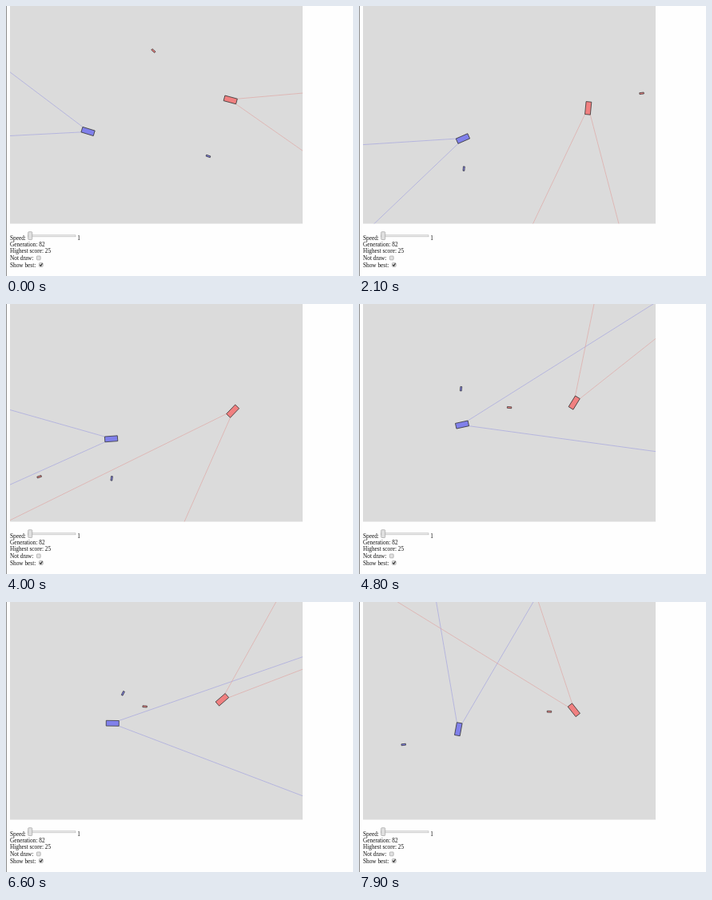
An HTML page that plays this animation: 434 px wide and 338 px high, repeating every 8000 ms.

```html
<!DOCTYPE html>
<html lang="en">
<head>
<meta charset="utf-8">
<title>Tank duel</title>
<style>
  html, body { margin: 0; width: 100%; height: 100%; overflow: hidden; background: #fefefe; }
  svg { display: block; width: 434px; height: 338px; }
  text { font: 7.3px "Liberation Serif", "Times New Roman", serif; fill: #111; }
  .box { fill: #e0e0e0; stroke: #a2a2a2; stroke-width: .7; }
  .body { stroke: #333; stroke-width: .75; }
  .shell { stroke: #333; stroke-width: .7; }
  .sight { fill: none; stroke-width: .6; }
</style>
</head>
<body>
<svg viewBox="0 0 434 338">
  <defs><clipPath id="field"><rect x="5" width="366" height="272.5"/></clipPath></defs>
  <rect width="1" height="338" fill="#8c8c8c"/>
  <rect x="5" width="366" height="272.5" fill="#dbdbdb"/>
  <g id="arena" clip-path="url(#field)"></g>

  <text x="5" y="292.5">Speed:</text>
  <rect x="27.5" y="286.8" width="59.5" height="2" fill="#eee" stroke="#b4b4b4" stroke-width=".6"/>
  <rect class="box" x="27.7" y="282.7" width="5" height="9.8" rx=".8"/>
  <text x="89.3" y="292.5">1</text>
  <text x="5" y="300.7">Generation: 82</text>
  <text x="5" y="309.2">Highest score: 25</text>
  <text x="5" y="317.7">Not draw:</text>
  <rect class="box" x="38.4" y="313" width="4.8" height="4.8" rx=".8"/>
  <text x="5" y="326.7">Show best:</text>
  <rect class="box" x="41.4" y="321.6" width="4.8" height="4.8" rx=".8"/>
  <path d="M42.3 323.9l1.2 1.4 2-3" fill="none" stroke="#222" stroke-width="1.1"/>
</svg>
<script>
const LOOP = 8000, STEP = 100;
const LENGTH = 16, WIDTH = 6.8, SHELL = 6;
const TURN_RADIUS = 9, SHELL_SPEED = 0.159, HIT_RANGE = 16;
const SIGHT = 20, REACH = 600;
const LEFT = 5, RIGHT = 371 - SHELL, TOP = 0, BOTTOM = 272.5 - SHELL;

// Blue stops turning and drives straight ahead for a while: [start, duration].
const straights = [[-960, 170], [860, 615], [3155, 135], [4956, 65]];
const STRAIGHT_HEADING = 24, STRAIGHT_SPEED = 0.0375;

function straightTime(t) {
  return straights.reduce((sum, [start, span]) =>
    sum + Math.min(Math.max(t - start, 0), span), 0);
}

const blue = {
  fill: '#8080ea', line: '#9c9cdf', firstShot: -1000, reload: 830,
  heading: t => 233.6 + 0.215 * (t - straightTime(t)),
  centre(t) {
    const [c, s] = unit(STRAIGHT_HEADING);
    const d = straightTime(t) * STRAIGHT_SPEED;
    return [99.4 + d * c, 145.8 + d * s];
  }
};
const red = {
  fill: '#f08080', line: '#e0a09c', firstShot: -735, reload: 800,
  heading: t => 15 + 0.2097 * t,
  centre: t => [278.4 - t * 0.00032, 126.1 + t * 0.00045]
};
const tanks = [blue, red];

function unit(degrees) {
  const a = degrees * Math.PI / 180;
  return [Math.cos(a), Math.sin(a)];
}

// Tanks circle clockwise around a slowly moving centre.
function position(tank, t) {
  const [cx, cy] = tank.centre(t);
  const [c, s] = unit(tank.heading(t));
  return [cx + TURN_RADIUS * s, cy - TURN_RADIUS * c];
}

// Distance a shell covers before it leaves the field or hits the enemy.
function flight([x, y], [c, s], [ex, ey]) {
  const exit = Math.min(
    ((c > 0 ? RIGHT : LEFT) - x) / c,
    ((s > 0 ? BOTTOM : TOP) - y) / s
  );
  const ahead = (ex - x) * c + (ey - y) * s;
  const miss = Math.abs((ex - x) * s - (ey - y) * c);
  const hits = ahead > 0 && miss < HIT_RANGE;
  return hits ? Math.min(exit, ahead - WIDTH / 2) : exit;
}

// The next shell is fired once the last one is gone and the gun is reloaded.
function fireAll(tank, enemy) {
  const shots = [];
  for (let time = tank.firstShot; time < LOOP;) {
    const from = position(tank, time), angle = tank.heading(time);
    shots.push({ time, from, angle });
    const range = flight(from, unit(angle), enemy.centre(time));
    time += Math.max(tank.reload, range / SHELL_SPEED);
  }
  return shots;
}

blue.shots = fireAll(blue, red);
red.shots = fireAll(red, blue);

const arena = document.getElementById('arena');

function add(tag, attrs) {
  const node = document.createElementNS('http://www.w3.org/2000/svg', tag);
  for (const name in attrs) node.setAttribute(name, attrs[name]);
  return arena.appendChild(node);
}

function addBlock(className, fill, width, height) {
  return add('rect', { class: className, fill, x: -width / 2, y: -height / 2, width, height });
}

for (const tank of tanks) tank.sight = add('path', { class: 'sight', stroke: tank.line });
for (const tank of tanks) {
  tank.body = addBlock('body', tank.fill, LENGTH, WIDTH);
  tank.shell = addBlock('shell', tank.fill, 5.4, 1.9);
}

function place(node, x, y, angle) {
  node.setAttribute('transform', `translate(${x} ${y}) rotate(${angle})`);
}

function sightLine(x, y, heading, side) {
  const [c, s] = unit(heading);
  const [dx, dy] = unit(heading + side * SIGHT);
  const px = x + c * LENGTH / 2 - side * s * WIDTH / 2;
  const py = y + s * LENGTH / 2 + side * c * WIDTH / 2;
  return `M${px} ${py}l${dx * REACH} ${dy * REACH}`;
}

function draw(t) {
  for (const tank of tanks) {
    const [x, y] = position(tank, t), heading = tank.heading(t);
    place(tank.body, x, y, heading);
    tank.sight.setAttribute('d', sightLine(x, y, heading, -1) + sightLine(x, y, heading, 1));

    const shot = tank.shots.filter(({ time }) => time <= t).pop();
    const [c, s] = unit(shot.angle);
    const flown = (t - shot.time) * SHELL_SPEED;
    place(tank.shell, shot.from[0] + flown * c, shot.from[1] + flown * s, shot.angle);
  }
}

function tick() {
  const t = performance.now() % LOOP;
  draw(Math.floor(t / STEP) * STEP);
  requestAnimationFrame(tick);
}
tick();
</script>
</body>
</html>
```
